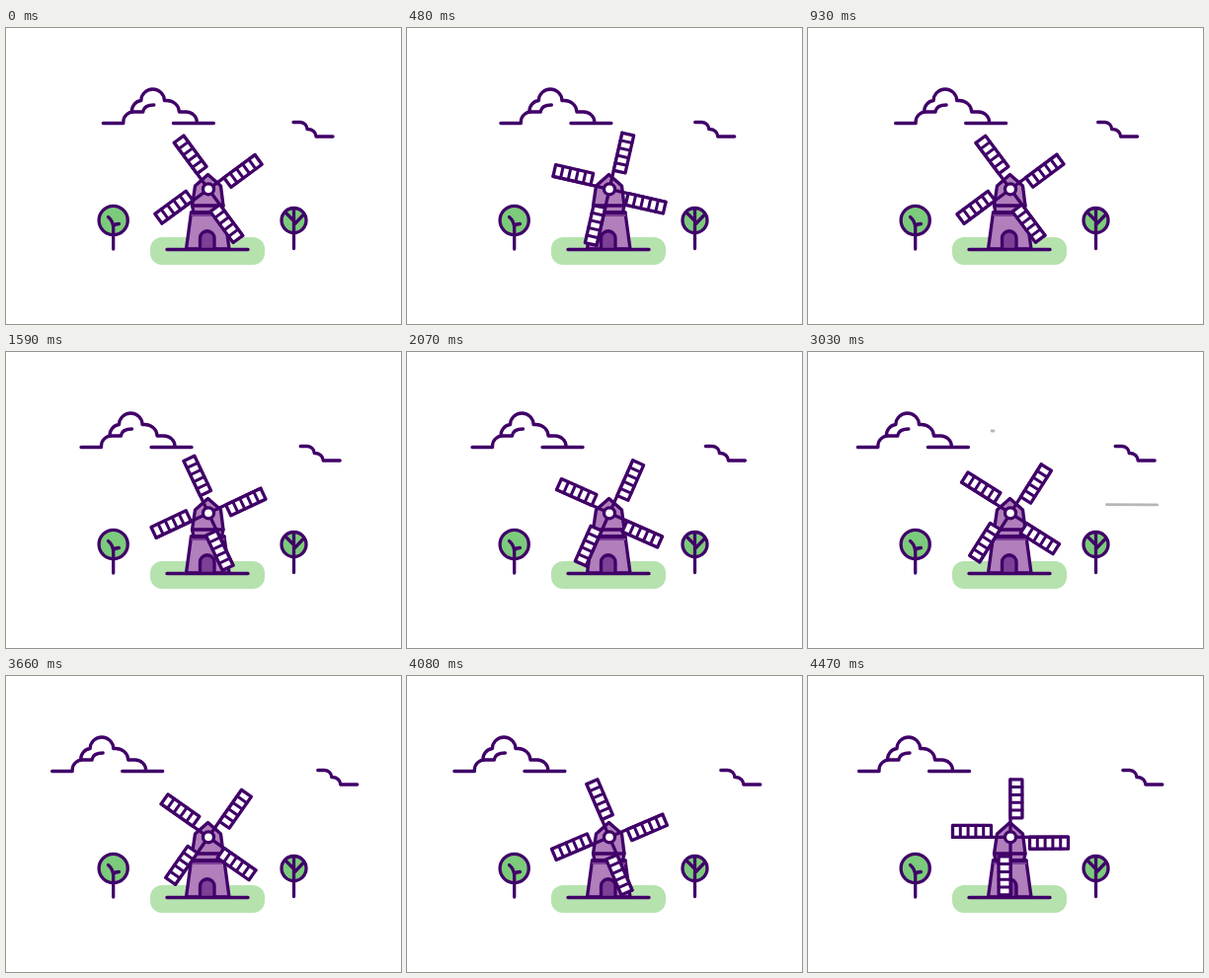
An HTML page that plays this animation: 400 by 300 pixels, repeating every 4500 ms.

```html
<!DOCTYPE html>
<html lang="en">
<head>
<meta charset="utf-8">
<title>Windmill</title>
<style>
  html, body { margin: 0; width: 100%; height: 100%; overflow: hidden; background: #fff; }
  svg { display: block; width: 100%; height: 100%; }
  .ink { fill: none; stroke: #400068; stroke-width: 3.3; stroke-linecap: round; stroke-linejoin: round; }
  .wind { fill: none; stroke: #b8b6ba; stroke-width: 2.8; stroke-linecap: round; }
  .leaf { fill: #7ccb7c; }
  .wall { fill: #b07fbc; }
  .dark { fill: #7c4097; }
  .white { fill: #fff; }
</style>
</head>
<body>
<svg viewBox="0 0 400 300">
  <defs>
    <g id="sail">
      <path d="M0 0V-58.5"/>
      <path class="white" d="M0 -19.5V-58.5H12V-19.5Z"/>
      <path stroke-width="3" d="M0 -27.3H12M0 -35.1H12M0 -42.9H12M0 -50.7H12"/>
    </g>
  </defs>

  <path class="wind" pathLength="1" d="M49.5 26.5H185"/>
  <path class="wind" pathLength="1" d="M90 48.5C140 48.5 140 80 188 80"/>
  <path class="wind" pathLength="1" d="M43.5 153L374 155"/>

  <g class="ink">
    <g id="cloud">
      <path d="M98 96.5H118.5V95A10.5 10 0 0 1 129 85H138.5V84Q140 78 149.5 78"/>
      <path d="M127 84.5A10.5 11 0 0 1 136.5 73.5A11.75 11.5 0 0 1 160 73.5H162.5A12.5 11.5 0 0 1 175 85H182A11 10.5 0 0 1 193 95.5V96.5M169 96.5H210"/>
    </g>
    <path id="wisp" d="M291 95.5H298A7 7 0 0 1 305 102.5H306A8 7.5 0 0 1 314 110H331"/>
  </g>

  <rect x="146" y="212" width="116" height="28" rx="12" fill="#b6e2ae"/>

  <g class="ink">
    <circle class="leaf" cx="108.7" cy="195" r="14.6"/>
    <path d="M108.7 224V203Q108.7 196 103.5 191.5M108.7 201Q110 198.5 114.5 198.5"/>
    <circle class="leaf" cx="291.5" cy="195" r="12.5"/>
    <path d="M291.5 223.5V183M283 187L291.5 195.5M301 189.5L291.5 199.5"/>
  </g>

  <g class="ink">
    <path class="wall" d="M187.5 187L182.5 224H226L221 187Z"/>
    <path class="dark" stroke="none" d="M188 187H221L221.5 191H187.5Z"/>
    <path class="wall" d="M188.5 180L191.5 160L204.5 148.5L217.5 160L220 180L218.5 187H190Z"/>
    <path d="M188.5 180H220M187.5 187H221"/>
    <path class="dark" d="M196.5 224V213A7.2 7.2 0 0 1 211 213V224"/>
    <path d="M163 224.5H245"/>
    <g id="sails">
      <use href="#sail"/>
      <use href="#sail" transform="rotate(90)"/>
      <use href="#sail" transform="rotate(180)"/>
      <use href="#sail" transform="rotate(270)"/>
    </g>
    <circle class="white" cx="205" cy="163.3" r="5.5"/>
  </g>
</svg>
<script>
const LOOP = 4500, STEP = 30;
const byId = id => document.getElementById(id);
const cloud = byId('cloud'), wisp = byId('wisp'), sails = byId('sails');

// Head start, head duration, tail start, tail duration
const gusts = [
  [960, 440, 1040, 500],
  [2550, 400, 2680, 380],
  [2300, 860, 2355, 965]
];
const winds = document.querySelectorAll('.wind');

const swing = (t, range, half) => range / 2 * (1 - Math.cos(Math.PI * t / half));
const ease = (t, start, duration) => {
  const p = Math.min(1, Math.max(0, (t - start) / duration));
  return p * p * (3 - 2 * p);
};

function draw(t) {
  cloud.setAttribute('transform', `translate(${0.7 - swing(t + 200, 52, 3900)})`);
  wisp.setAttribute('transform', `translate(${swing(t, 28, 4700)})`);
  sails.setAttribute('transform', `translate(205 163.3) rotate(${53.6 + t * 0.29})`);
  gusts.forEach(([headStart, headTime, tailStart, tailTime], i) => {
    const tail = ease(t, tailStart, tailTime);
    const length = ease(t, headStart, headTime) - tail;
    const style = winds[i].style;
    style.visibility = length > 0.001 ? 'visible' : 'hidden';
    style.strokeDasharray = `${Math.max(length, 0)} 2`;
    style.strokeDashoffset = -tail;
  });
}

const begin = performance.now();
function tick() {
  const t = (performance.now() - begin) % LOOP;
  draw(Math.floor(t / STEP) * STEP);
  requestAnimationFrame(tick);
}
tick();
</script>
</body>
</html>
```
